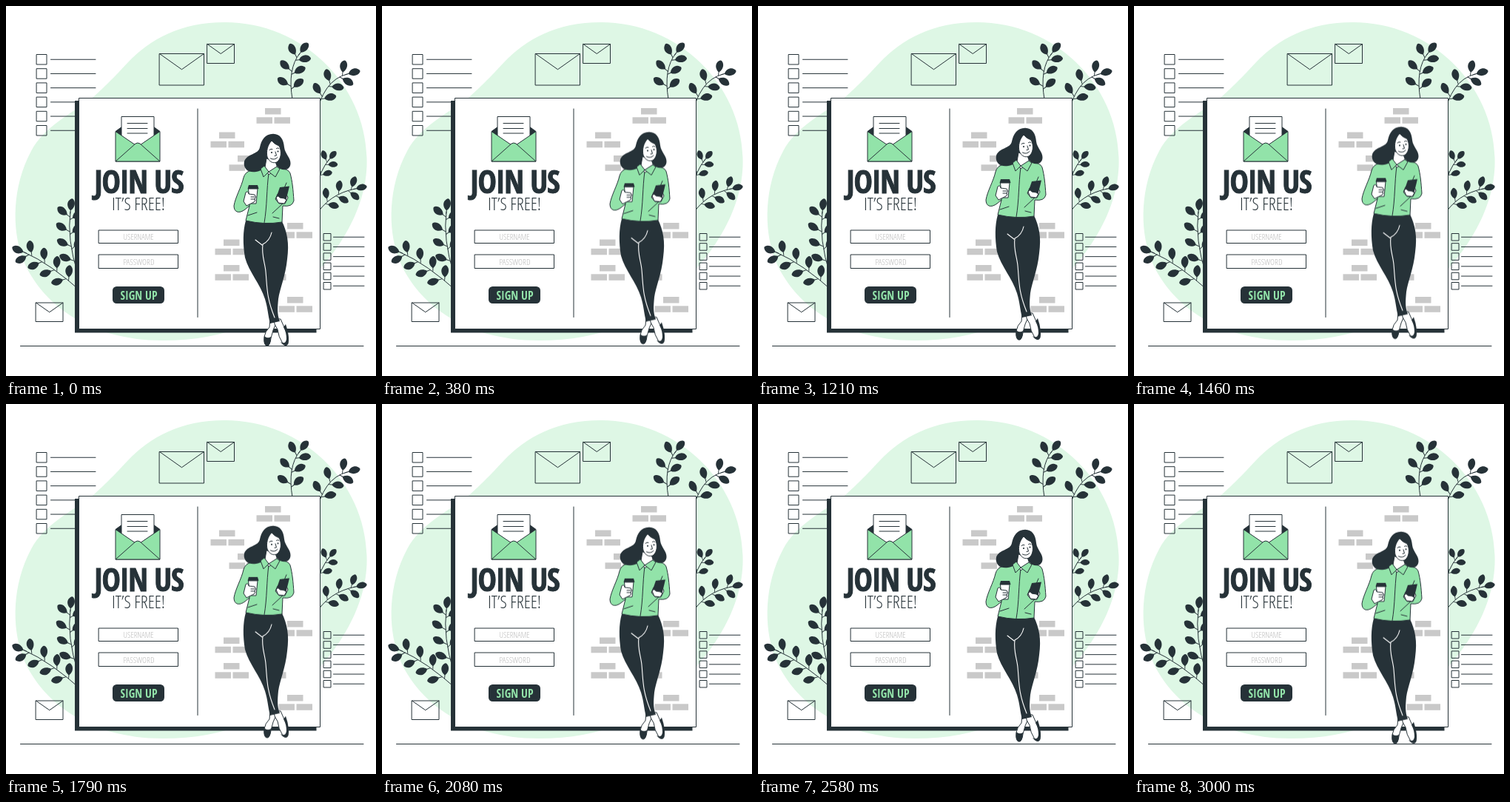
These frames come from a looping animation (500x500 px, 3.04 s). An HTML page:

```html
<!DOCTYPE html>
<html lang="en">
<head>
<meta charset="utf-8">
<title>Join us</title>
<style>
  html, body { margin: 0; width: 100%; height: 100%; overflow: hidden; background: #fff; }
  svg { display: block; width: 100vw; height: 100vh; }
  .line { fill: none; stroke: #263238; stroke-linecap: round; stroke-linejoin: round; }
  .ink { fill: #263238; }
  .paper { fill: #fff; }
  .mint { fill: #92e3a9; }
  .brick { fill: #c9c9c9; }
  .edge { stroke: #263238; stroke-linejoin: round; }
  .light { fill: none; stroke: #fff; stroke-width: 1.1; stroke-linecap: round; }
  text { font-stretch: 75%; text-anchor: middle; fill: #263238; }
  .bold { font-family: "Open Sans Condensed", "Roboto Condensed", "Open Sans", sans-serif; font-weight: 700; }
  .thin { font-family: "Open Sans Condensed Light", "Open Sans", "Noto Sans", sans-serif; font-weight: 300; }
  .title { letter-spacing: -.027em; stroke: #263238; stroke-width: .9; }
  .hint { fill: #b9b9b9; }
  .action { fill: #92e3a9; }
  #woman { animation: float 3040ms linear infinite; }
  @keyframes float { 50% { transform: translateY(-10px); } }
</style>
</head>
<body>
<svg viewBox="0 0 500 500">
  <path fill="#def7e5" d="M487.5 205C485 105 400 22 296 22C235 22 195 45 165 76C140 103 130 112 118 123C90 145 52 162 34 196C8 245 8 300 22 340C45 400 110 452 212 452C300 452 350 425 400 380C450 335 490 270 487.5 205Z"/>
  <g id="plants"></g>
  <g id="outlines" class="line"><path d="M19.5 459.5H483"/></g>

  <path class="ink" d="M93 128H419.5V441.5H93Z"/>
  <path class="paper edge" d="M98.5 124.5H424.5V436.5H98.5Z"/>
  <path class="line" d="M259 139V420.5"/>

  <g class="edge">
    <path class="ink" d="M148 169.5L157 163H199L208 169.5L178 190Z"/>
    <path class="paper" d="M156 149.5H200V190H156Z"/>
    <path class="line" d="M164 158.5H191M164 165.5H191M164 172H191"/>
    <path class="mint" d="M148 169.5L178 190L208 169.5V210H148Z"/>
    <path class="mint" d="M148 210L175 186Q178 184 181 186L208 210Z"/>
  </g>

  <text class="bold title" x="179.5" y="253" font-size="45" data-max="120">JOIN US</text>
  <text class="thin" x="179" y="276" font-size="23.5" data-max="73">IT’S FREE!</text>
  <path class="line" d="M125.5 303H232.5V320.5H125.5ZM125.5 336H232.5V354.5H125.5Z"/>
  <text class="thin hint" x="179" y="316" font-size="11.5" data-max="41">USERNAME</text>
  <text class="thin hint" x="179.5" y="349.5" font-size="11.5" data-max="42">PASSWORD</text>
  <rect class="ink" x="144" y="379" width="70" height="23" rx="5.5"/>
  <text class="bold action" x="179.5" y="396.5" font-size="16" data-max="50">SIGN UP</text>

  <g id="bricks" class="brick"></g>

  <g id="woman">
    <!-- feet -->
    <g class="paper edge">
      <path d="M357 423L356 434Q350 440 349 447Q348 458 353 459Q357 458 358 449L361 438L367 424Z"/>
      <path d="M361 423Q363 432 367 437Q368 447 374 456Q379 461 381 456Q383 448 379 441L375 432L371 423Z"/>
    </g>
    <path class="ink" d="M349 446Q353 450 358 447Q358 459 353 459.5Q347 459 349 446ZM378 430Q384 447 381 457Q377 462 371 454Q378 458 379 450Q379 441 375 434Z"/>

    <!-- trousers -->
    <path class="ink" d="M324 290C320 304 320 322 323 340C328 359 344 376 350 396C354 409 354 418 357 429L370 426C366 416 367 407 368 396C370 382 378 364 380 342C383 320 380 306 373 291Z"/>
    <path class="light" d="M337 316L346 323M359 306C357 315 353 319 347 322C345 337 350 347 351 359C353 381 352 394 363 421"/>

    <!-- shirt -->
    <g class="mint edge">
      <path d="M347 219L332 222Q323 224 321 232C318 245 310 258 308 270C308 279 315 281 323 275L329 270L324 290Q349 296 373 292L374 270Q387 272 389 263C388 248 387 237 384 226Q382 220 369 219Z"/>
      <path class="line" d="M355 226C352 248 353 270 349 293M331 244L329 270M327 283L339 279M374 267L360 280M379 239L376 246M369 287L361 285"/>
    </g>

    <!-- head -->
    <path class="ink" d="M361 172.7C350 173 345 181 343 191C341 201 326 199 322 210C320 219 327 226 338 224C345 223 350 219 352 214L366 216C372 224 384 223 384.5 213C385 205 377 200 376 191C375 180 371 173 361 172.7Z"/>
    <path class="paper edge" d="M352 206L350 218L355 228L367 219L364 210Z"/>
    <path class="paper edge" d="M359 182C353 188 351.5 197 353 204C356 211 361 213 366 211C372 207 373 196 369 189Q363 187 359 182Z"/>
    <path class="line" d="M356 194.5Q358 192.5 360 193.5M365.5 192.5Q367.5 191 369 192.5M364 197L365.5 202L363 202.5M357.5 206Q363 209 367 204.5"/>
    <circle class="ink" cx="359" cy="198" r="1.1"/>
    <circle class="ink" cx="367.5" cy="196.5" r="1.1"/>
    <path class="mint edge" d="M349 216L344 220L348 231L355 224ZM366 217L355 224L364 231L370 220Z"/>

    <!-- cup -->
    <path class="paper edge" d="M327.5 247H340L338 267H329.5Z"/>
    <path class="paper edge" d="M321 264L324 252Q327 249 328 254L336 255Q339 258 336 261Q338 263 335 265L325 270Z"/>
    <path class="line" d="M336 258H331M336 261H331"/>
    <path class="ink" d="M328 242H340L341.5 247H326.5Z"/>

    <!-- phone -->
    <path class="paper edge" d="M367 254L364 261L369 267H377L381 259L378 252Z"/>
    <path class="ink" d="M370 245L383 243.5L378 264L364.5 261Z"/>
    <path class="paper edge" d="M365 259Q368 255 370 259L376 260L379 262L376 267L368 266Z"/>
  </g>
</svg>
<script>
  const NS = "http://www.w3.org/2000/svg";

  function path(group, d, cls = "") {
    const el = document.createElementNS(NS, "path");
    el.setAttribute("d", d);
    el.setAttribute("class", cls);
    document.getElementById(group).append(el);
    return el;
  }

  function leaf({ x, y }, angle, scale) {
    const el = path("plants", "M0 -.4L5 -.5C9 -6 16 -7 20 -2Q22 0 20 2C16 6 9 5 5 .5L0 .4Z", "ink");
    el.setAttribute("transform", `translate(${x} ${y}) rotate(${angle}) scale(${scale})`);
  }

  // A curved stem with evenly spaced leaf pairs and one leaf at its tip.
  function plant(d, pairs, scale = 1) {
    const stem = path("plants", d, "line");
    const total = stem.getTotalLength();
    const heading = at => {
      const a = stem.getPointAtLength(at - 1), b = stem.getPointAtLength(at);
      return Math.atan2(b.y - a.y, b.x - a.x) * 180 / Math.PI;
    };
    leaf(stem.getPointAtLength(total - 3), heading(total), scale);
    for (let i = 1; i <= pairs; i++) {
      const at = total - (i * 20 - 11) * scale;
      for (const side of [-1, 1]) {
        leaf(stem.getPointAtLength(at - side * 2), heading(at) + side * 55, scale);
      }
    }
  }

  plant("M387 126Q380 85 397 64", 3);
  plant("M418 152Q428 100 461 92", 3);
  plant("M420 246Q424 222 437 207", 2, 0.8);
  plant("M418 284Q436 254 472 247", 3, 0.9);
  plant("M97 362Q82 315 87 278", 4);
  plant("M104 388Q60 348 25 333", 4);

  function checklist(x, y, size, pitch, from, to) {
    for (let i = 0; i < 6; i++) {
      const top = y + i * pitch;
      path("outlines", `M${x} ${top}h${size}v${size}h${-size}ZM${from} ${top + size / 2}H${to}`);
    }
  }
  checklist(41.5, 65.5, 13.5, 19.2, 60.5, 121);
  checklist(429.5, 307.5, 9.5, 13.2, 442.5, 484);

  function envelope(x, y, w, h) {
    path("outlines", `M${x} ${y}h${w}v${h}h${-w}Zl${w / 2} ${h / 2}l${w / 2} ${-h / 2}`);
  }
  envelope(207.5, 64.5, 60, 42.5);
  envelope(272, 51.5, 36.5, 26);
  envelope(40.5, 401, 36.5, 25.5);

  const brick = (x, y) => path("bricks", `M${x} ${y}h21.5v8.5h-21.5Z`);
  const stacks = [[350, 138], [288, 170.5], [313, 202], [380, 293], [294, 315.5], [294, 350], [380, 393]];
  for (const [x, y] of stacks) {
    brick(x, y);
    brick(x - 11.5, y + 12.3);
    brick(x + 12.5, y + 12.3);
  }
  brick(357, 362.3);

  // Keep each line within its column, whichever condensed face is present.
  for (const t of document.querySelectorAll("text")) {
    const size = parseFloat(t.getAttribute("font-size"));
    const ratio = t.dataset.max / t.getComputedTextLength();
    t.setAttribute("font-size", size * Math.min(1, ratio));
  }
</script>
</body>
</html>
```
